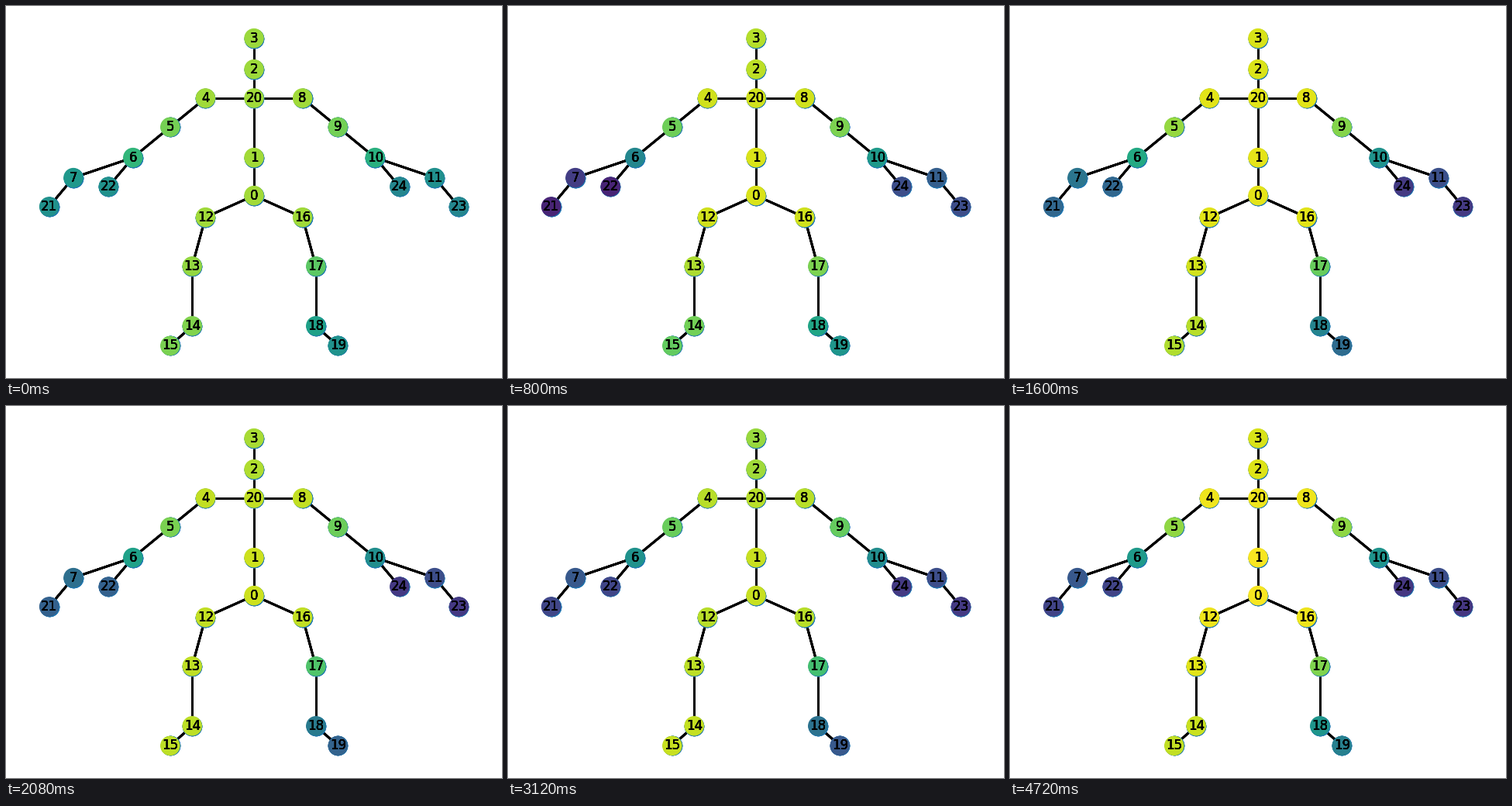
A matplotlib script that plays this animation: 640x480 px, repeating every 4.8 s.

```python
import numpy as np
import matplotlib.pyplot as plt
from matplotlib.animation import FuncAnimation
from matplotlib.collections import LineCollection

W, H = 640, 480
FRAMES, STEP = 60, 80
LAYERS = 5  # stacked copies harden the antialiased edges

# Joint positions in pixels: spine, then the left side, mirrored for the right
pos = {joint: (W / 2, y) for joint, y in
       zip((3, 2, 20, 1, 0), (41.6, 81.6, 118.9, 195.6, 244.6))}
left = {4: (257.4, 118.9), 5: (211.8, 156.2), 6: (163.8, 195.6), 7: (86.9, 221.6),
        21: (55.6, 258.9), 22: (132.2, 233.1),
        12: (257.4, 272.6), 13: (240.2, 335.8), 14: (240.2, 412.8), 15: (211.8, 438.4)}
twin = {21: 23, 22: 24}
for joint, (x, y) in left.items():
    pos[joint] = (x, y)
    pos[twin.get(joint, joint + 4)] = (W - x, y)

SPINE = (1, 20, 2, 3)
LIMBS = {"left hand": (4, 5, 6, 7, 21), "right hand": (8, 9, 10, 11, 23),
         "left foot": (12, 13, 14, 15), "right foot": (16, 17, 18, 19)}
THUMBS = {22: 21, 24: 23}

chains = [(0, *SPINE), (6, 22), (10, 24)]
chains += [(20 if "hand" in name else 0, *limb) for name, limb in LIMBS.items()]
bones = [(pos[a], pos[b]) for chain in chains for a, b in zip(chain, chain[1:])]

# Activity at the body's ends, in percent, at a few key steps
KEYS = [0, 5, 15, 20, 32, 48, 59]
ENDS = {
    "hip": [86, 97, 92, 96, 89, 95, 99],
    "head": [85, 94, 84, 94, 80, 90, 94],
    "left hand": [50, 17, 3, 33, 28, 12, 20],
    "right hand": [46, 23, 24, 17, 16, 18, 16],
    "left foot": [80, 89, 63, 88, 92, 91, 91],
    "right foot": [51, 44, 60, 35, 28, 27, 43],
}


def spread(chain, start, end):
    """Ease the activity from the root of a chain to its tip."""
    u = np.clip(np.arange(len(chain)) / (len(chain) - 1.3), 0, 1)
    return dict(zip(chain, start + (end - start) * u * u * (3 - 2 * u)))


def activity(i):
    ends = {name: np.interp(i, KEYS, track) for name, track in ENDS.items()}
    level = {0: ends["hip"], **spread(SPINE, ends["hip"], ends["head"])}
    for name, limb in LIMBS.items():
        level.update(spread(limb, level[20], ends[name]))
    for thumb, hand in THUMBS.items():
        level[thumb] = level[hand]
    return np.array([level[j] for j in joints])


joints = sorted(pos)
xs, ys = np.array([pos[j] for j in joints]).T

fig = plt.figure(figsize=(W / 100, H / 100), dpi=100, facecolor="white")
ax = fig.add_axes([0, 0, 1, 1])
ax.set(xlim=(0, W), ylim=(H, 0))
ax.axis("off")

for _ in range(LAYERS):
    ax.add_collection(LineCollection(bones, colors="black", linewidths=2, zorder=1))
    ax.scatter(xs, ys, s=300, color="#1f78b4", zorder=2)
    for joint, x, y in zip(joints, xs, ys):
        ax.text(x, y, str(joint), size=12, family="DejaVu Sans", color="black",
                ha="center", va="center", zorder=4)
discs = ax.scatter(xs, ys, s=300, c=activity(0), cmap="viridis", vmin=0, vmax=100, zorder=3)


def update(i):
    discs.set_array(activity(i))
    return [discs]


anim = FuncAnimation(fig, update, frames=FRAMES, interval=STEP, repeat=True, repeat_delay=0)
plt.show()
```
